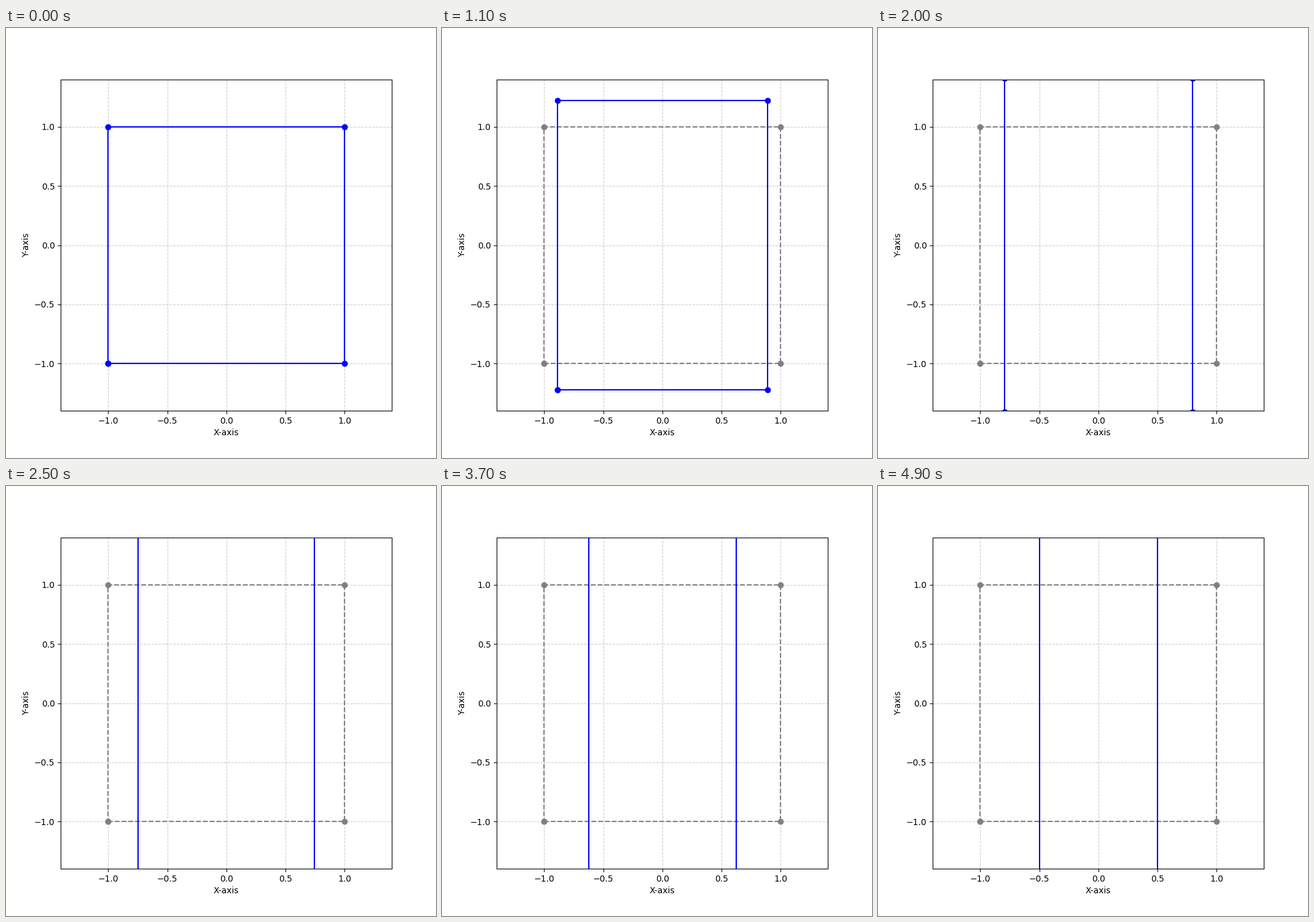
Animation of 700x700 px, one loop 5000 ms. Source, as a matplotlib script:

```python
import numpy as np
import matplotlib.pyplot as plt
from matplotlib.animation import FuncAnimation

FRAMES = 50
INTERVAL = 100

plt.rcParams["font.family"] = "DejaVu Sans"

# Closed unit square, counter-clockwise from the lower left corner
square = np.array([[-1, -1], [1, -1], [1, 1], [-1, 1], [-1, -1]], dtype=float)

fig, ax = plt.subplots(figsize=(7, 7), dpi=100)
ax.set_xlim(-1.4, 1.4)
ax.set_ylim(-1.4, 1.4)
ax.set_aspect("equal")
ax.set_xticks(np.arange(-1, 1.1, 0.5))
ax.set_yticks(np.arange(-1, 1.1, 0.5))
ax.set_xlabel("X-axis")
ax.set_ylabel("Y-axis")
ax.grid(True, linestyle="--", alpha=0.6)

ax.plot(*square.T, "o--", color="gray")
stretched, = ax.plot(*square.T, "o-", color="blue")


def update(frame):
    """Scale linearly from the identity to half width and double height."""
    t = frame / (FRAMES - 1)
    scale = np.array([1 - 0.5 * t, 1 + t])
    stretched.set_data(*(square * scale).T)
    return stretched,


anim = FuncAnimation(fig, update, frames=FRAMES, interval=INTERVAL,
                     repeat=True, repeat_delay=0)
plt.show()
```
